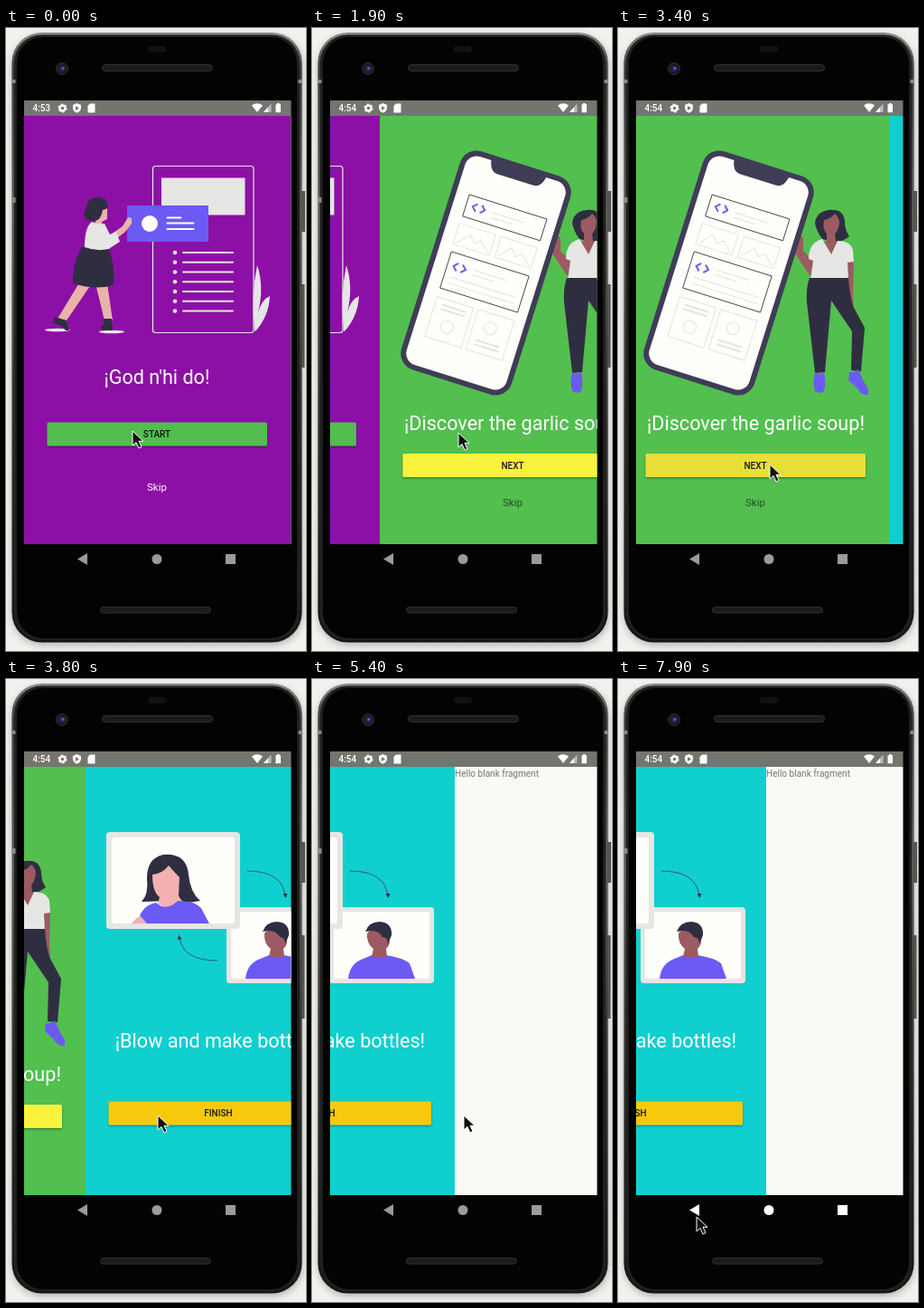
An HTML page for the animation above (8000 ms loop, 332 by 688 pixels).

```html
<!DOCTYPE html>
<html lang="en">
<head>
<meta charset="utf-8">
<title>Onboarding pager</title>
<style>
  html, body { margin: 0; width: 100%; height: 100%; overflow: hidden; background: #f1f1ee; }
  svg { display: block; width: 100%; height: 100%; }
  text { font-family: Roboto, sans-serif; }
  .title { font-size: 21.6px; fill: #fff; text-anchor: middle; }
  .label { font-size: 10px; font-weight: 500; fill: #161616; text-anchor: middle; }
  .skip { font-size: 11.5px; text-anchor: middle; }
  .ink { fill: #2f2e41; }
  .violet { fill: #6c5af4; }
  .pale { fill: #e6e6e4; }
  .skin { fill: #9c5b62; }
  .pink { fill: #f5b0b2; }
  .line { fill: none; stroke: #e3e3e1; stroke-width: 1; }
</style>
</head>
<body>
<svg viewBox="0 0 332 688" preserveAspectRatio="none">
  <defs>
    <clipPath id="screen"><rect x="20" y="97" width="295.5" height="473"/></clipPath>
    <linearGradient id="rim" x2="0" y2="1">
      <stop offset="0" stop-color="#8b8b88"/><stop offset=".06" stop-color="#3a3a38"/>
      <stop offset=".3" stop-color="#5a5a57"/><stop offset=".6" stop-color="#33332f"/>
      <stop offset="1" stop-color="#161614"/>
    </linearGradient>
    <filter id="blur" x="-10%" y="-10%" width="120%" height="120%"><feGaussianBlur stdDeviation="4"/></filter>
    <filter id="drop" x="-5%" y="-20%" width="110%" height="160%">
      <feDropShadow dx="0" dy="1.2" stdDeviation=".8" flood-opacity=".4"/>
    </filter>
    <path id="code" d="M-2.5-4.5L-7 0l4.500 4.500M2.500-4.500L7 0 2.500 4.500" fill="none" stroke="#6c5af4" stroke-width="2"/>
  </defs>

  <!-- device -->
  <rect width="332" height="688" fill="#f1f1ee"/>
  <rect x="7" y="9" width="321" height="672" rx="33" fill="#777" opacity=".55" filter="url(#blur)"/>
  <path d="M327 180h4v45h-4zM327 283h3.500v92h-3.500z" fill="#555552"/>
  <rect x="6.500" y="5" width="321" height="673.500" rx="33" fill="url(#rim)"/>
  <rect x="9" y="7.500" width="316" height="668.500" rx="31" fill="#20201e"/>
  <rect x="12" y="10" width="310" height="664" rx="29" fill="#030303"/>
  <path d="M6.500 57h4v4h-4zM6.500 187h4v6h-4zM323.500 57h4v4h-4z" fill="#8a8a86"/>
  <rect x="157" y="20" width="20" height="7" rx="3" fill="#111"/>
  <g fill="#1b1b1b" stroke="#303030">
    <rect x="106.500" y="40.500" width="122" height="7" rx="3.500"/>
    <rect x="104.500" y="639.500" width="122" height="6.500" rx="3.200"/>
    <circle cx="62" cy="45" r="6.500"/>
  </g>
  <circle cx="62" cy="45" r="3.500" fill="#28205a"/>
  <circle cx="63" cy="44.500" r="1.600" fill="#6d55b8"/>

  <!-- status bar -->
  <rect x="20" y="80" width="295.500" height="17" fill="#757570"/>
  <text id="clock" x="29.500" y="92" font-size="10" font-weight="500" fill="#fff">4:53</text>
  <g fill="#fff">
    <circle cx="62.500" cy="88.500" r="3" fill="none" stroke="#fff" stroke-width="2.400"/>
    <circle cx="62.500" cy="88.500" r="4.500" fill="none" stroke="#fff" stroke-width="1.200" stroke-dasharray="2.200 2.512"/>
    <path d="M78.500 83l4.500 2v3q0 4-4.500 5.800-4.500-1.800-4.500-5.800v-3z"/>
    <path d="M93 83.500h5.500V93.500H90.500v-7.500z"/>
    <path d="M272 85.500q6-4.500 12 0l-6 7.500z"/>
    <path d="M293.500 83.500V93H285z" opacity=".5"/><path d="M290 87.500V93h-5z"/>
    <path d="M300 83h2.500v1.200h1.500v9h-5.500v-9h1.500z"/>
  </g>
  <path d="M77 86l4 2.500-4 2.500z" fill="#757570"/>

  <g clip-path="url(#screen)">
    <!-- first page -->
    <g class="page">
      <rect x="20" y="96" width="296" height="475" fill="#8d10a6"/>
      <g class="pale">
        <path d="M275 334q-4-40 3-72 8 24 1 52 4-14 13-18-1 22-16 39z"/>
        <rect x="172" y="165.500" width="92.500" height="41"/>
        <ellipse cx="57" cy="333.500" rx="14" ry="1.800"/><ellipse cx="117" cy="335.500" rx="14" ry="1.800"/>
      </g>
      <rect x="162.500" y="152.500" width="111.500" height="184" rx="3" fill="none" stroke="#e6e6e4" stroke-width="1.200"/>
      <g id="list" class="pale"></g>
      <rect x="134" y="196" width="90" height="40" class="violet"/>
      <circle cx="159" cy="216" r="9" fill="#fff"/>
      <path d="M178.500 209.500h15M178.500 215.500h29M178.500 222h29" stroke="#fff" stroke-width="2" stroke-linecap="round"/>
      <path fill="#e9b3aa" d="M82 280l13 2-28 41-10-2zM99 282h13l6 41h-9zM116 228l13-9 6-10 4 1v6l-7 9-14 11zM103 197l9 2v12l-6 3 2 6-10-2z"/>
      <path class="ink" d="M54 319l13 4 3 11h-4l-4-5-10-3zM108 321h9l1 13h-11q-5-2 1-7z"/>
      <path class="ink" d="M84 242h29q8 20 6 42-20 6-45-2 0-24 10-40z"/>
      <path class="pale" d="M95 214q9 4 14 2l6 12 7-3 4 11-11 7-1 1q-14 3-27-2 0-22 8-28z"/>
      <path class="ink" d="M88 210q-4-7 1-11 0-11 11-12 11-1 13 9 0 4-6 5-2 12-9 12-7 1-10-3z"/>
      <text class="title" x="167" y="393">¡God n'hi do!</text>
      <g class="button" data-y="435.500" data-fill="#51be4e">START</g>
      <text class="skip" x="167" y="511" fill="#fff">Skip</text>
    </g>

    <!-- second page -->
    <g class="page">
      <rect x="20" y="96" width="296" height="475" fill="#52bf4f"/>
      <g transform="translate(16)">
        <path class="skin" d="M196 233l4-5 4 4 0 14 15 16-1 14-7-3-16-24zM251 245l9 8-1 42 1 12-5 4-4-7z"/>
        <path class="ink" d="M217 216q1-13 15-15 17-2 18 13 0 9 5 16-10 8-18 6l-12-3q-6-8-8-17z"/>
        <path class="skin" d="M227 212q7-1 12-7 7 6 4 15-2 6-4 7l1 8 5 2-8 16-11-16 4-2v-8q-5-4-3-15z"/>
        <path class="pale" d="M225 233l10 17 7-15q14 0 17 10l1 13-7 1 1 19h-42l3-21-5-2q0-18 15-22z"/>
        <path class="ink" d="M211 276h43q1 17 5 31l13 24-4 48-11-1 1-43-23-34-7 79-11 1-9-78q-1-17 3-27z"/>
        <path class="violet" d="M217 380q5 3 10 0 3 16-1 22-6 2-9-1-3-9 0-21zM255 380q6 1 10-3 4 11 11 22v6q-8 1-12-7l-10-9z"/>
        <g transform="translate(121.500 270.500) rotate(17.500)">
          <rect x="-64" y="-126.500" width="128" height="253" rx="19" fill="#3f3d56"/>
          <rect x="-58" y="-120.500" width="116" height="241" rx="13" fill="#fefefb"/>
          <path d="M-32-122h64q-2 14-11 14h-42q-9 0-11-14z" fill="#3f3d56"/>
          <g fill="none" stroke="#45454a" stroke-width=".9">
            <rect x="-43.500" y="-77" width="90" height="25"/><rect x="-43.500" y="-11" width="90" height="42"/>
          </g>
          <use href="#code" x="-29" y="-65.500"/><use href="#code" x="-29.500" y="3.500"/>
          <path class="line" stroke-width="2" d="M-14-65.500H24M-14-60H11M-14 1H24M-14 6.500H11M-36 16H40M-36 23H40"/>
          <g class="line">
            <path d="M-44.500-43.500h42v24h-42zM4-43.500h42v24H4zM-43.500 41h42v46h-42zM4 41h42v46H4z"/>
            <path d="M-41-22l12-13 7 8 6-5 11 10M7-22l12-13 7 8 6-5 11 10"/>
            <path d="M-36 48h28M-36 53h28M11 74h28M11 79h28" stroke-width="2"/>
            <circle cx="-23" cy="70" r="7"/><circle cx="23" cy="57" r="7"/>
          </g>
        </g>
      </g>
      <text class="title" x="167.500" y="444">¡Discover the garlic soup!</text>
      <g class="button" data-y="470" data-fill="#f9f33d">NEXT</g>
      <text class="skip" x="167" y="527.500" fill="#23502a">Skip</text>
    </g>

    <!-- third page -->
    <g class="page">
      <rect x="20" y="96" width="296" height="475" fill="#10cfcf"/>
      <g transform="translate(-65)">
        <rect class="pale" x="241" y="252" width="116" height="84" rx="4"/>
        <rect x="246" y="257" width="106" height="74" rx="3" fill="#fefefb"/>
        <path class="violet" d="M262 331q2-16 14-21l12-5q8 3 16 0 19 3 26 9l6 17z"/>
        <path class="skin" d="M283 281q4-6 14-4l10 6q3 10-3 15l1 8q-9 4-17 0l2-8q-8-6-7-17z"/>
        <path class="ink" d="M281 279q4-11 16-11 14 1 13 15l-4 10q0-8-6-8-4-7-12-7z"/>
        <rect class="pale" x="108" y="169" width="148" height="107" rx="4"/>
        <rect x="114" y="175" width="136" height="95" rx="3" fill="#fefefb"/>
        <path class="ink" d="M147 246q8-8 6-26 0-22 18-26 26-2 28 22 2 20 13 29-20 4-34 0z"/>
        <path class="pink" d="M159 216q11-1 18-10 7 8 12 13l-1 20q2 6 8 8l-14 9-17-8 2-7q-8-6-8-25zM136 270q6-8 14-10l8 10z"/>
        <path class="violet" d="M145 261q6-12 18-14 12 10 24-2 22 0 27 10l8 15h-69z"/>
        <g fill="none" stroke="#3b4a60" stroke-width=".9">
          <path d="M264 212q38 0 42 27M231 311q-38 0-42-25"/>
        </g>
        <path d="M303.500 237h5l-2 5zM186.500 287.500h5l-3-5z" class="ink"/>
      </g>
      <text class="title" x="167.500" y="407">¡Blow and make bottles!</text>
      <g class="button" data-y="466.500" data-fill="#f6c90a">FINISH</g>
    </g>

    <!-- last page -->
    <g class="page">
      <rect x="20" y="96" width="296" height="475" fill="#f9faf5"/>
      <text x="20" y="108" font-size="10.040" fill="#757575">Hello blank fragment</text>
    </g>
  </g>

  <g id="nav">
    <path d="M79 586.500l11-6.500v13z"/><circle cx="167" cy="586.500" r="5.500"/><rect x="243" y="581" width="11" height="11"/>
  </g>
  <path id="cursor" d="M0 0v16l4-3.500 3 6.500 3-1.400-3-6.300h5z" fill="#111" stroke="#fff" stroke-width="1"/>
</svg>

<script>
const LOOP = 8000, STEP = 100, PAGE = 295, GLIDE = 750;
const $ = id => document.getElementById(id);
const pages = [...document.querySelectorAll('.page')];
const slides = [[1363, 1], [3290, 1], [5010, 1], [7531, -1]];
const presses = [[1100, 1400], [3200, 3600], [5000, 5200]];
const pressed = ['#4bb049', '#e7df39', '#e5bb0a'];
const trail = [
  [0, 140, 445], [500, 140, 445], [900, 162, 447], [2300, 162, 447], [2400, 163, 454],
  [2500, 163, 454], [2700, 168, 482], [6200, 168, 482], [6600, 87, 594], [LOOP, 87, 594]
];

$('list').innerHTML = Array.from({ length: 7 }, (_, i) => {
  const y = 248 + i * 10.75;
  return `<circle cx="187" cy="${y}" r="2.3"/><rect x="195" y="${y - 1}" width="57" height="2" rx="1"/>`;
}).join('');

const buttons = [...document.querySelectorAll('.button')].map(g => {
  const { y, fill } = g.dataset;
  g.innerHTML = `<rect x="45.5" y="${y}" width="243.5" height="26" rx="1.5" filter="url(#drop)"/>
    <text class="label" x="167" y="${+y + 16.7}">${g.textContent}</text>`;
  return { face: g.firstChild, fill };
});

const clamp = u => Math.min(1, Math.max(0, u));
const ease = u => (1 - Math.cos(Math.PI * clamp(u))) / 2;

function cursorAt(t) {
  const i = trail.findIndex(k => k[0] > t);
  const [t0, x0, y0] = trail[i - 1], [t1, x1, y1] = trail[i];
  const u = (t - t0) / (t1 - t0);
  return [x0 + (x1 - x0) * u, y0 + (y1 - y0) * u];
}

function draw(now) {
  const t = Math.floor(now % LOOP / STEP) * STEP;
  const scroll = slides.reduce((s, [start, dir]) => s + dir * ease((t - start) / GLIDE), 0);
  pages.forEach((p, i) => p.setAttribute('transform', `translate(${Math.round((i - scroll) * PAGE)})`));
  buttons.forEach(({ face, fill }, i) => {
    const [from, to] = presses[i];
    face.setAttribute('fill', t >= from && t < to ? pressed[i] : fill);
  });
  $('clock').textContent = t < 600 ? '4:53' : '4:54';
  $('nav').setAttribute('fill', t < 7400 ? '#9b9b9b' : '#fff');
  $('cursor').setAttribute('transform', `translate(${cursorAt(t)})`);
}

const begin = performance.now();
function tick() {
  draw(performance.now() - begin);
  requestAnimationFrame(tick);
}
tick();
</script>
</body>
</html>
```
